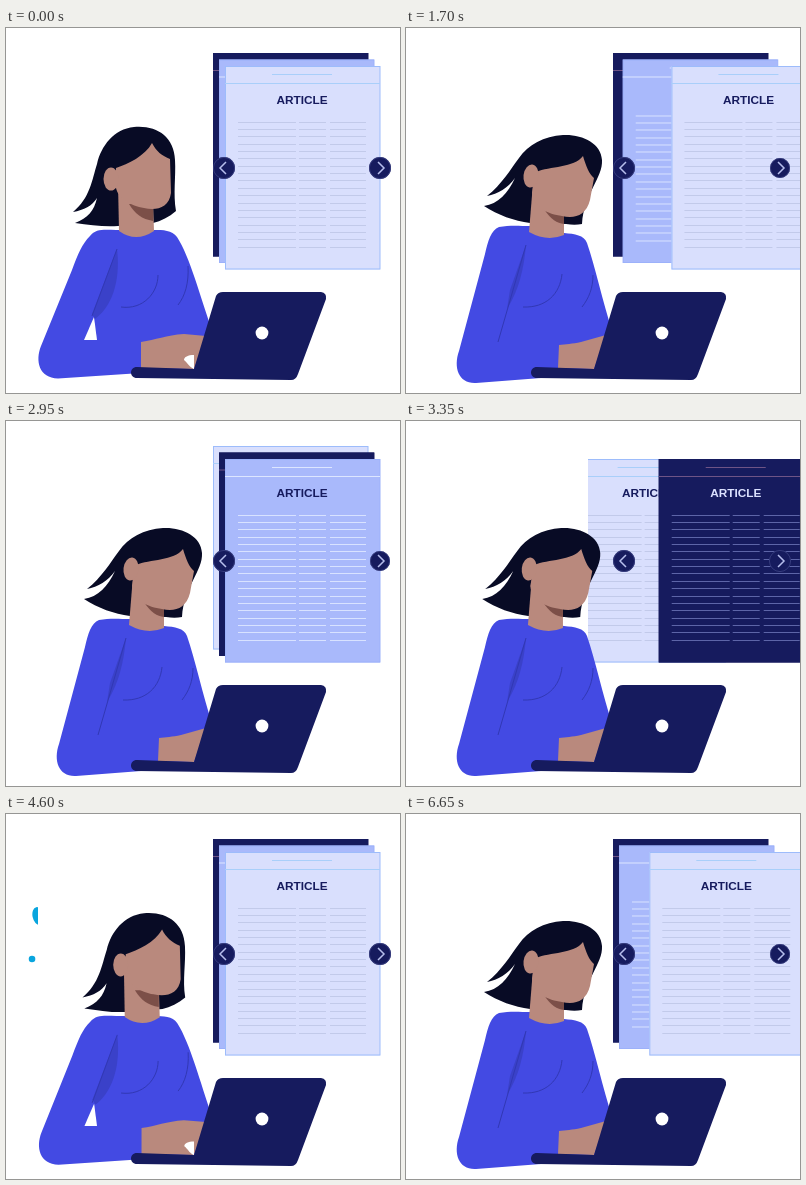
Recreate the animation shown at these times as an HTML page with a canvas. Size 394 by 365 pixels, loop 6.7 s.

```html
<!DOCTYPE html>
<html lang="en">
<head>
<meta charset="utf-8">
<title>Reading articles</title>
<style>
html, body { margin: 0; width: 100%; height: 100%; overflow: hidden; background: #fff; }
canvas { display: block; }
</style>
</head>
<body>
<canvas id="stage" width="394" height="365"></canvas>
<script>
const ctx = document.getElementById('stage').getContext('2d');
const W = 394, H = 365, LOOP = 6700, CYCLE = 5000;
const NAVY = '#161b5e', SKIN = '#b9897d', HAIR = '#080b25', BLUE = '#434ae3', SHADE = '#3a41c9', SEAM = '#3138b4';

const clamp = v => Math.max(0, Math.min(1, v));
const ease = u => u < .5 ? 2 * u * u : 1 - 2 * (1 - u) * (1 - u);
const ramp = (t, a, b) => ease(clamp((t - a) / (b - a)));
const lerp = (a, b, u) => a + (b - a) * u;

// Eased value through [time, value] keys
function keyed(t, keys) {
  for (let i = 1; i < keys.length; i++) {
    const [t0, v0] = keys[i - 1], [t1, v1] = keys[i];
    if (t < t1) return lerp(v0, v1, ramp(t, t0, t1));
  }
  return keys[keys.length - 1][1];
}

// Blend two path strings that share the same commands
function blend(a, b, u) {
  const nums = b.match(/-?[\d.]+/g);
  let i = 0;
  return new Path2D(a.replace(/-?[\d.]+/g, n => lerp(+n, +nums[i++], u).toFixed(2)));
}

function fill(path, color) {
  ctx.fillStyle = color;
  ctx.fill(path);
}

function stroke(path, color, width = 1) {
  ctx.strokeStyle = color;
  ctx.lineWidth = width;
  ctx.stroke(path);
}

function oval(x, y, rx, ry, color, tilt = 0) {
  ctx.beginPath();
  ctx.ellipse(x, y, rx, ry, tilt, 0, Math.PI * 2);
  ctx.fillStyle = color;
  ctx.fill();
}

function shifted(dx, draw) {
  ctx.save();
  ctx.translate(dx, 0);
  draw();
  ctx.restore();
}

// Each part: [upright pose, leaning pose]
const POSE = {
  hair: [
    'M128 99 C150 97 168 108 169 132 C170 150 167 165 170 183 C163 189 155 193 147 195 L112 198 C98 199 84 197 69 195 C82 190 88 183 91 170 C86 178 78 182 67 184 C84 170 86 152 91 136 C95 118 108 101 128 99Z',
    'M157 107 C176 106 195 115 196 132 C197 150 178 165 176 196 C171 197 166 197 160 196 L124 195 C108 193 92 187 78 178 C92 176 102 165 109 150 C102 160 92 166 81 168 C96 156 104 142 113 130 C122 117 138 108 157 107Z'],
  body: [
    'M110 202 C100 202 90 200 84 208 C76 216 72 226 66 242 L35 318 C29 333 33 350 52 350.5 L135 345 L190 345 L206 302 C194 268 184 229 171 209 C166 202 157 202 148 202Z',
    'M125 198 C113 198 104 197 93 199 C85 202 82 213 79 226 L53 323 C47 340 53 356 70 355 L135 350 L190 345 L206 302 C197 275 189 238 181 215 C178 207 169 206 158 205Z'],
  gap: ['M78 312 L88 289 L91 312Z', 'M92 314 L92 314 L92 314Z'],
  sleeve: ['M111 221 C114 245 110 275 89 291 L86 286Z', 'M120 217 C118 240 113 262 101 281 L104 262Z'],
  seam: ['M111 221 L86 288', 'M120 217 L92 314'],
  bust: ['M152 247 C152 265 137 282 115 279', 'M156 246 C154 266 140 280 117 279'],
  side: ['M182 238 C183 255 179 268 172 277', 'M187 247 C187 260 183 270 176 279'],
  neck: ['M112 155 L113 203 Q130 215 148 203 L147 172Z', 'M127 155 L123 204 Q141 214 158 207 L158 180Z'],
  shadow: ['M123 176 C129 186 136 191 147 193 L147 176Z', 'M138 181 C145 192 151 195 158 196 L158 185Z'],
  face: [
    'M110 140 C122 136 139 128 146 115 C150 123 156 128 164 131 L165 165 C163 180 150 183 138 180 C125 178 112 170 110 160Z',
    'M130 144 C144 138 168 140 177 128 C180 138 183 146 188 150 L184 172 C180 188 168 191 156 188 C142 186 128 180 126 165Z'],
  hand: [
    'M135 314 C150 312 160 307 178 306 L200 308 L188 341 L135 340Z',
    'M153 317 C160 316 166 316 175 314 L200 307 L188 341 L152 340Z'],
  space: ['M188 327 C182 327 178 329 178 332 C181 334 183 339 188 341Z', 'M188 340 C188 340 188 340 188 340 C188 340 188 340 188 340Z']
};

const LAPTOP = new Path2D('M131 339 L188 341 L210 268 Q212 264 217 264 L315 264 Q321 265 320 271 L292 346 Q290 352 285 352 L131 350 C123 350 123 339 131 339Z');

function drawWoman(lean, sway, body) {
  const part = (name, u) => blend(...POSE[name], u);
  shifted(sway, () => fill(part('hair', lean), HAIR));
  fill(part('body', body), BLUE);
  fill(part('gap', body), '#fff');
  fill(part('sleeve', body), SHADE);
  for (const name of ['seam', 'bust', 'side']) stroke(part(name, body), SEAM);
  shifted(sway * .6, () => {
    fill(part('neck', lean), SKIN);
    fill(part('shadow', lean), '#7c4f48');
  });
  shifted(sway, () => {
    fill(part('face', lean), SKIN);
    oval(lerp(105, 125, lean), lerp(151, 148, lean), 7.5, 11.5, SKIN, lean * .12);
  });
  fill(part('hand', body), SKIN);
  fill(part('space', body), '#fff');
  fill(LAPTOP, NAVY);
  oval(256, 305, 6.4, 6.4, '#fff');
}

const STYLE = {
  light: { fill: '#d9dffd', edge: '#9dbcfb', rule: '#a9cffa', title: NAVY, text: '#c2caea' },
  mid: { fill: '#a9b9fb', edge: '#9cb1fa', rule: '#dde6ff', title: NAVY, text: '#d8e2ff' },
  navy: { fill: NAVY, edge: NAVY, rule: '#6e5486', title: '#dbe1ff', text: '#5d65a8' }
};

function line(x0, x1, y) {
  ctx.beginPath();
  ctx.moveTo(x0, y);
  ctx.lineTo(x1, y);
  ctx.stroke();
}

function drawCard(name, x, y) {
  const s = STYLE[name];
  ctx.fillStyle = s.fill;
  ctx.fillRect(x, y, 155, 203.5);
  ctx.lineWidth = 1;
  ctx.strokeStyle = s.edge;
  ctx.strokeRect(x + .5, y + .5, 154.5, 202.5);
  ctx.strokeStyle = s.rule;
  line(x, x + 155, y + 17.5);
  line(x + 47, x + 107, y + 8.5);
  ctx.fillStyle = s.title;
  ctx.font = '700 11.8px "Liberation Sans", Arial, sans-serif';
  ctx.textAlign = 'center';
  ctx.fillText('ARTICLE', x + 77, y + 38.3);
  ctx.strokeStyle = s.text;
  for (let i = 0; i < 18; i++) {
    const ly = y + Math.round(55.5 + i * 7.37) + .5;
    line(x + 13, x + 71, ly);
    line(x + 74, x + 101, ly);
    line(x + 105, x + 141, ly);
  }
}

function drawCards(p) {
  const rest = [['navy', 207, 25], ['mid', 213, 31.5], ['light', 219, 38]];
  if (p < 1520) {
    rest.forEach(c => drawCard(...c));
  } else if (p < 3000) {
    // Front card slides right, then tucks in at the back
    const out = ramp(p, 1520, 1980), back = ramp(p, 1980, 2200);
    const drop = ramp(p, 1750, 2050);
    const light = ['light', lerp(219 + 150 * out, 207, back), lerp(38, 25, back)];
    if (p >= 1980) drawCard(...light);
    drawCard('navy', 207 + 6 * drop, 25 + 6.5 * drop);
    drawCard('mid', 213 + 6 * ramp(p, 1650, 1740), 31.5 + 6.5 * drop);
    if (p < 1980) drawCard(...light);
  } else if (p < 3600) {
    const step = ramp(p, 3050, 3300);
    drawCard('light', lerp(207, 20, ramp(p, 3250, 3550)), lerp(25, 38, step));
    drawCard('navy', 213 + 6 * step + 180 * ramp(p, 3250, 3580), 31.5 + 6.5 * step);
    drawCard('mid', 219 + 180 * ramp(p, 3000, 3350), 38);
  } else {
    const join = ramp(p, 3850, 4180);
    drawCard('navy', lerp(396, 207, join), 25);
    drawCard('mid', lerp(396, 213, join), 31.5);
    drawCard('light', lerp(10, 219, ramp(p, 3600, 3950)), 38);
  }
}

function drawArrow(x, r, dir) {
  oval(x, 140, r, r, NAVY);
  ctx.beginPath();
  ctx.arc(x, 140, r - .4, 0, Math.PI * 2);
  ctx.strokeStyle = '#3d4384';
  ctx.lineWidth = .8;
  ctx.stroke();
  ctx.beginPath();
  ctx.moveTo(x - 2 * dir, 134);
  ctx.lineTo(x + 4 * dir, 140);
  ctx.lineTo(x - 2 * dir, 146);
  ctx.strokeStyle = '#b6beec';
  ctx.lineWidth = 1.5;
  ctx.stroke();
}

function clipped(x, w, draw) {
  ctx.save();
  ctx.beginPath();
  ctx.rect(x, 0, w, H);
  ctx.clip();
  draw();
  ctx.restore();
}

// Blue drops drifting in at the left edge
function drawDrops(t) {
  if (t < 3400 || t > 4900) return;
  const u = (t - 3750) / 850, near = clamp(u);
  clipped(0, 32, () => {
    oval(5 + 27 * u, 117 - 15 * near, 8 - 2.5 * near, 11 - 2 * near, '#09a5de', -.2);
    oval(5 + 21 * u, 145, 5 - 1.7 * near, 4 - .7 * near, '#09a5de');
    if (t > 3650 && t < 3850) {
      ctx.fillStyle = '#35282f';
      ctx.fillRect(0, 194, 1.6, 47);
    }
  });
}

function render(t) {
  const p = t % CYCLE;
  ctx.fillStyle = '#fff';
  ctx.fillRect(0, 0, W, H);
  clipped(182, W - 182, () => drawCards(p));
  drawDrops(t);
  const lean = keyed(p, [[0, 0], [560, 0], [1350, 1], [4250, 1], [4620, .03], [4950, 0]]);
  const sway = keyed(p, [[0, 0], [3000, 0], [3750, -4], [4250, 0], [4600, 9], [4950, 0]]);
  const body = keyed(p, [[0, 0], [650, 0], [1300, 1], [4250, 1], [4650, 0]]);
  drawWoman(lean, sway, body);
  drawArrow(218, 11, -1);
  drawArrow(374, 11 - keyed(p, [[0, 0], [1350, 0], [1550, 1], [3000, 1], [3300, 0]]), 1);
}

function tick(now) {
  render(now % LOOP);
  requestAnimationFrame(tick);
}
requestAnimationFrame(tick);
</script>
</body>
</html>
```
